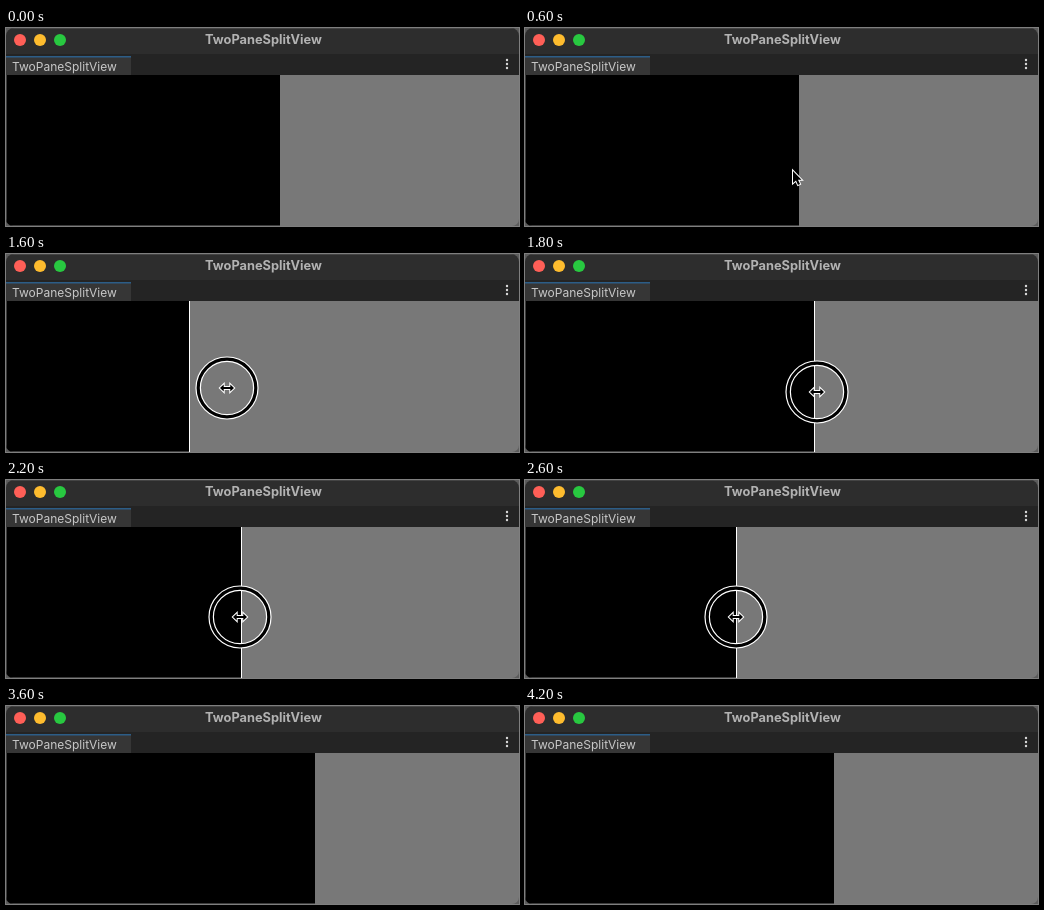
An HTML page with a canvas that plays this animation: 513 by 198 pixels, repeating every 4400 ms.

```html
<!DOCTYPE html>
<html lang="en">
<head>
<meta charset="utf-8">
<title>TwoPaneSplitView</title>
<style>
html, body { margin: 0; width: 100%; height: 100%; overflow: hidden; background: #000; }
canvas { display: block; }
</style>
</head>
<body>
<canvas id="stage" width="513" height="198"></canvas>
<script>
const W = 513, H = 198, LOOP = 4400, TOP = 47;
const ctx = document.getElementById('stage').getContext('2d');

// Each pose holds until the next one; x and y are the cursor's hot spot.
const poses = [
  { t: 0, split: 274 },
  { t: 400, split: 274, cursor: 'arrow', x: 259, y: 151 },
  { t: 600, split: 274, cursor: 'arrow', x: 268, y: 143 },
  { t: 800, split: 274, cursor: 'resize', x: 274, y: 139 },
  { t: 1200, split: 271, cursor: 'drag', x: 264, y: 139 },
  { t: 1400, split: 192, cursor: 'drag', x: 183, y: 137 },
  { t: 1600, split: 183, cursor: 'drag', x: 221, y: 134 },
  { t: 1800, split: 289, cursor: 'drag', x: 292, y: 138 },
  { t: 2000, split: 286, cursor: 'drag', x: 284, y: 138 },
  { t: 2200, split: 235, cursor: 'drag', x: 234, y: 137 },
  { t: 2600, split: 211, cursor: 'drag', x: 211, y: 137 },
  { t: 2800, split: 262, cursor: 'drag', x: 263, y: 138 },
  { t: 3000, split: 309, cursor: 'drag', x: 309, y: 139 },
  { t: 3200, split: 309 }
];

function rect(color, x, y, w, h) {
  ctx.fillStyle = color;
  ctx.fillRect(x, y, w, h);
}

function disc(color, x, y, r) {
  ctx.fillStyle = color;
  ctx.beginPath();
  ctx.arc(x, y, r, 0, Math.PI * 2);
  ctx.fill();
}

function ring(color, x, y, r, width) {
  ctx.strokeStyle = color;
  ctx.lineWidth = width;
  ctx.beginPath();
  ctx.arc(x, y, r, 0, Math.PI * 2);
  ctx.stroke();
}

function shape(points, x, y) {
  ctx.beginPath();
  for (const [px, py] of points) ctx.lineTo(x + px, y + py);
  ctx.closePath();
  ctx.lineJoin = 'miter';
  ctx.lineWidth = 2;
  ctx.strokeStyle = '#fff';
  ctx.stroke();
  ctx.fillStyle = '#000';
  ctx.fill();
}

function label(text, font, color, x, y, align) {
  ctx.font = font + ' Inter, Roboto, sans-serif';
  ctx.fillStyle = color;
  ctx.textAlign = align;
  ctx.fillText(text, x, y);
}

const arrow = [[0, 0], [0, 12], [3, 9.5], [5, 14], [7, 13], [5, 8.7], [8.5, 8.7]];
const half = [[-7, 0], [-3.3, -3.6], [-3.3, -1], [3.3, -1], [3.3, -3.6], [7, 0]];
const resize = half.concat(half.slice(1, 5).reverse().map(([x, y]) => [x, -y]));

function drawChrome() {
  rect('#2d2d2d', 0, 0, W, 26);
  rect('#444', 0, 0, W, 1);
  ['#ff5f57', '#febc2e', '#28c840'].forEach((c, i) => disc(c, 14 + i * 20, 12, 6));
  label('TwoPaneSplitView', '700 12.8px', '#b2b2b2', 257.5, 16, 'center');

  rect('#242424', 0, 26, W, 21);
  rect('#363636', 0, 28, 125, 19);
  rect('#2c5d87', 0, 28, 125, 1.5);
  label('TwoPaneSplitView', '400 12px', '#c8c8c8', 6, 42.5, 'left');
  for (let i = 0; i < 3; i++) disc('#d8d8d8', 501, 32 + i * 4, 1.2);
}

function draw(t) {
  const p = poses.filter(q => q.t <= t).pop();
  rect('#5c5c5c', 0, 0, W, H);
  ctx.save();
  ctx.beginPath();
  ctx.roundRect(0, 0, W, H, [8, 8, 7, 7]);
  ctx.clip();

  drawChrome();
  rect('#000', 0, TOP, p.split, H - TOP);
  rect('#787878', p.split, TOP, W - p.split, H - TOP);
  rect('#3c3c3c', 0, TOP, 1, H - TOP);
  rect('#3c3c3c', 0, H - 1, p.split, 1);

  const hot = p.cursor === 'resize' || p.cursor === 'drag';
  if (hot) rect('#fff', p.split, TOP, 1, H - TOP);
  if (p.cursor === 'drag') {
    ring('#fff', p.x, p.y, 28.8, 5.6);
    ring('#000', p.x, p.y, 28.8, 3.2);
  }
  if (hot) shape(resize, p.x, p.y);
  if (p.cursor === 'arrow') shape(arrow, p.x, p.y);
  ctx.restore();
}

const start = performance.now();
function frame() {
  draw((performance.now() - start) % LOOP);
  requestAnimationFrame(frame);
}
frame();
</script>
</body>
</html>
```
